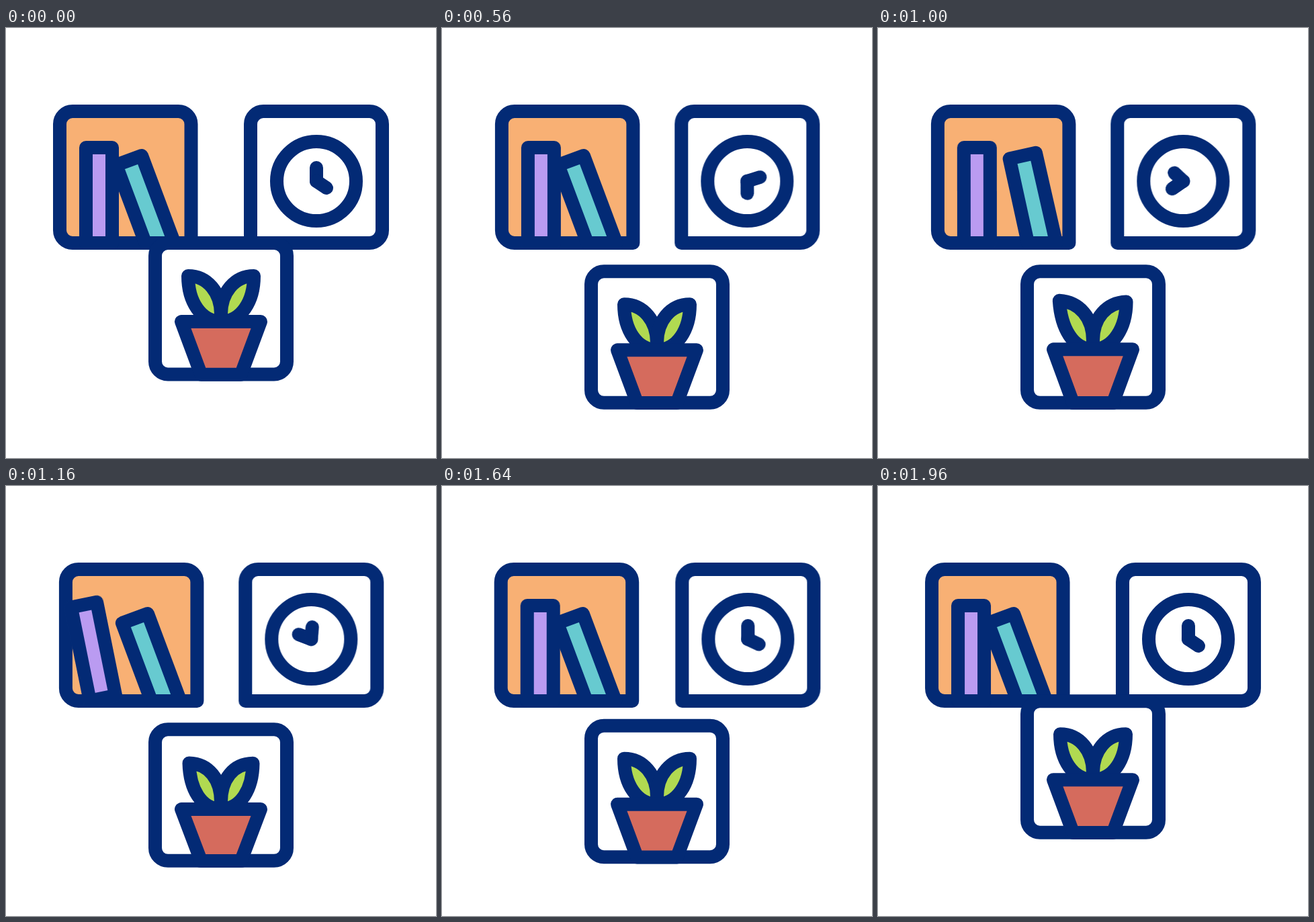
These frames come from a looping animation (640x640 px, 2 s). An HTML page without scripts:

```html
<!DOCTYPE html>
<html lang="en">
<head>
<meta charset="utf-8">
<title>Wall shelves</title>
<style>
  html, body { margin: 0; width: 100%; height: 100%; overflow: hidden; background: #fff; }
  svg { display: block; width: 100%; height: 100%; }

  :root {
    --smooth: cubic-bezier(.333, 0, .667, 1);
    --speed-up: cubic-bezier(.333, 0, .667, .5);
    --slow-down: cubic-bezier(.333, .5, .667, 1);
  }

  .line { fill: none; stroke: #032a75; stroke-width: 20; stroke-linecap: round; stroke-linejoin: round; }
  .orange { fill: #f8b074; }
  .purple { fill: #ba9bf1; }
  .teal { fill: #67cad0; }
  .green { fill: #b1da51; }
  .red { fill: #d56b5d; }

  .move { animation: 2s var(--smooth) infinite; }

  /* shelves drift apart and come back */
  .shelf { animation-name: drift; }
  .left { --to: 8.9px 0px; }
  .right { --to: -7.7px 0px; }
  .low { --to: 0px 42.3px; }
  @keyframes drift {
    0%, 5% { translate: 0px 0px; }
    27%, 77% { translate: var(--to); }
    99%, 100% { translate: 0px 0px; }
  }

  /* books rock from one wall to the other */
  .book { animation-name: rock; transform-origin: 138.5px 320px; }
  @keyframes rock {
    0%, 28% { transform: translate(0px, 0px) rotate(0deg); }
    40% { transform: translate(2.6px, -6.8px) rotate(14deg); animation-timing-function: var(--speed-up); }
    50% { transform: translate(0px, 0px) rotate(0deg); animation-timing-function: var(--slow-down); }
    58% { transform: translate(-3.4px, -4.2px) rotate(-11.4deg); }
    72%, 100% { transform: translate(0px, 0px) rotate(0deg); }
  }
  .leaning { animation-name: lean; }
  @keyframes lean {
    0%, 28%, 58%, 100% { d: path("M164 204 L202 190 L250.6 320 L207.4 320 Z"); }
    40% { d: path("M219.1 181 L260.1 179.5 L264.8 320 L223.8 320 Z"); }
  }

  /* clock hands: one full turn each, at their own pace */
  .hand { transform-origin: 462px 228px; }
  .minute { animation-name: minute; }
  .hour { animation-name: hour; }
  @keyframes minute {
    0%, 8% { transform: rotate(0deg); }
    77.6%, 100% { transform: rotate(360deg); }
  }
  @keyframes hour {
    0%, 7.6% { transform: rotate(0deg); }
    89.6%, 100% { transform: rotate(360deg); }
  }

  /* plant stretches, then settles */
  .pot { animation-name: pot; }
  @keyframes pot {
    0%, 28%, 72%, 100% { d: path("M261 437 L379 437 L349.7 515.8 L290.3 515.8 Z"); }
    40% { d: path("M261 432.3 L379 432.3 L349.7 515.8 L290.3 515.8 Z"); }
    58% { d: path("M261 438.7 L379 438.7 L349.7 515.8 L290.3 515.8 Z"); }
  }
  .leaf-a { animation-name: leaf-a; }
  @keyframes leaf-a {
    0%, 28%, 72%, 100% { d: path("M271 369 C300 369 320 394 320 426 L320 437 C290 437 271 407 271 369 Z"); }
    40% { d: path("M266 354 C297 358 320 380 320 416 L320 432.3 C290 432.3 271 398 266 354 Z"); }
    58% { d: path("M272.5 370.2 C302 371 320 394.5 320 428 L320 438.7 C290 438.7 273.5 408 272.5 370.2 Z"); }
  }
  .leaf-b { animation-name: leaf-b; }
  @keyframes leaf-b {
    0%, 28%, 72%, 100% { d: path("M369 369 C340 369 320 394 320 426 L320 437 C350 437 369 407 369 369 Z"); }
    40% { d: path("M372.5 357.7 C343 360 320 382 320 416 L320 432.3 C350 432.3 373 398 372.5 357.7 Z"); }
    58% { d: path("M367.5 370.5 C338 371 320 394.5 320 428 L320 438.7 C350 438.7 367 408 367.5 370.5 Z"); }
  }
</style>
</head>
<body>
<svg viewBox="0 0 640 640">
  <g class="move shelf left">
    <path class="line orange" d="M275.5 320H99a19 19 0 0 1-19-19V143a19 19 0 0 1 19-19H256.5a19 19 0 0 1 19 19Z"/>
    <path class="line teal move leaning" d="M164 204 L202 190 L250.6 320 L207.4 320 Z"/>
    <rect class="line purple move book" x="119" y="178" width="39" height="142"/>
  </g>

  <g class="move shelf right">
    <path class="line" d="M364 320V143a19 19 0 0 1 19-19H541a19 19 0 0 1 19 19V301a19 19 0 0 1-19 19Z"/>
    <circle class="line" cx="462" cy="228" r="59"/>
    <path class="line move hand minute" d="M462 228V208"/>
    <path class="line move hand hour" d="M462 228L477 238"/>
  </g>

  <g class="move shelf low">
    <rect class="line" x="222" y="320" width="196" height="195.5" rx="19"/>
    <path class="line green move leaf-a" d="M271 369 C300 369 320 394 320 426 L320 437 C290 437 271 407 271 369 Z"/>
    <path class="line green move leaf-b" d="M369 369 C340 369 320 394 320 426 L320 437 C350 437 369 407 369 369 Z"/>
    <path class="line red move pot" d="M261 437 L379 437 L349.7 515.8 L290.3 515.8 Z"/>
  </g>
</svg>
</body>
</html>
```
